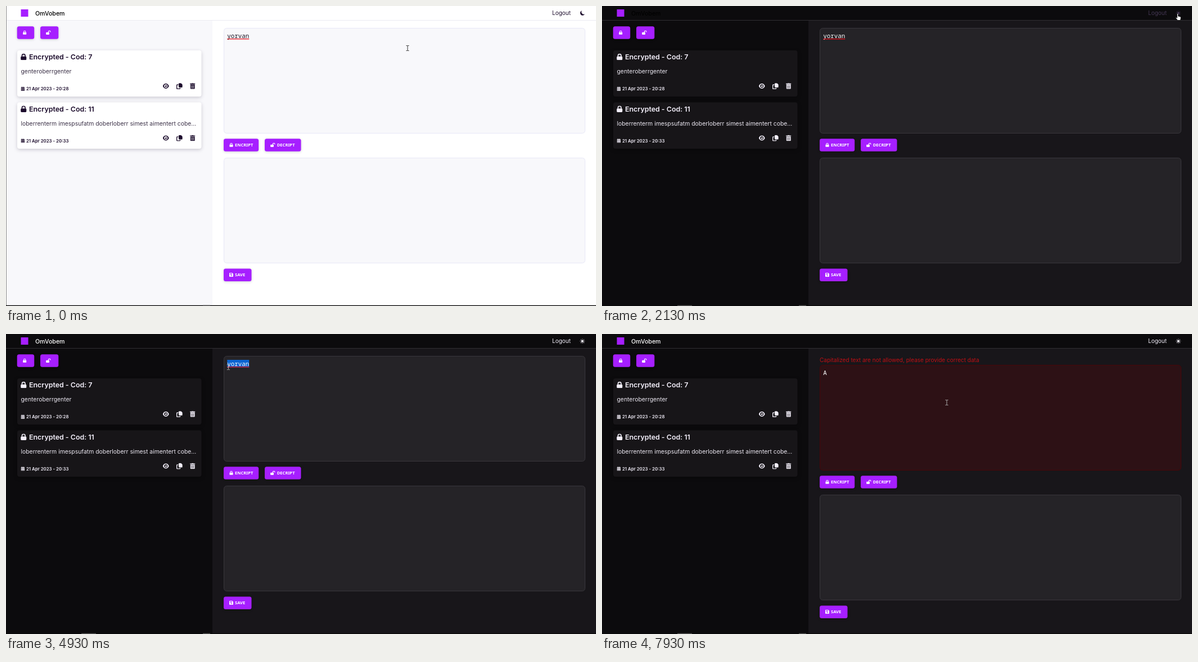
Recreate the animation shown at these times as an HTML page. Size 1049 by 534 pixels, loop 8000 ms.

```html
<!DOCTYPE html>
<html lang="en">
<head>
<meta charset="utf-8">
<title>Text encrypter</title>
<style>
  html, body { margin: 0; width: 100%; height: 100%; overflow: hidden; }
  svg { display: block; }
  #stage {
    --page: #fff; --side: #f8f8fb; --bar: #fff; --line: #ebebf1; --card: #fff;
    --box: #f8f8fb; --edge: #e7e7f7; --ink: #1c0c2c; --soft: #3c3248; --type: #17101f;
    --shade: rgba(20, 10, 40, .2); --beam: #333; --base: #050505; --bit: #444;
    width: 1049px; height: 534px;
    font-family: Inter, sans-serif; color: var(--ink);
  }
  #stage.dark {
    --page: #18161a; --side: #0c0b0d; --bar: #0c0b0d; --line: #302e33; --card: #171518;
    --box: #252327; --edge: #39363c; --ink: #f3effa; --soft: #ece8f2; --type: #fff;
    --shade: rgba(0, 0, 0, .3); --beam: #aaa; --base: #0a0a0a; --bit: #555;
  }
  text { fill: currentColor; white-space: pre; }
  use { fill: currentColor; }
  .card rect { fill: var(--card); filter: drop-shadow(0 2px 3px var(--shade)); }
  .title { font-size: 12.4px; font-weight: 600; }
  .body { font-size: 10.4px; fill: var(--soft); }
  .date { font-size: 7.8px; font-weight: 600; }
  .btn { color: #fff; }
  .btn rect { fill: #a61fff; filter: drop-shadow(0 1px 2px var(--shade)); }
  .btn text { font: 700 7.6px "Noto Sans", sans-serif; }
  .box { fill: var(--box); stroke: var(--edge); }
  .box.bad { fill: #2d1115; stroke: #480609; }
  .typed { font: 10.83px "Noto Sans Mono", monospace; fill: var(--type); }
  .pointer { fill: #fff; stroke: #000; stroke-width: .8; stroke-linejoin: round; }
</style>
</head>
<body>
<svg id="stage" viewBox="0 0 1049 534">
  <defs>
    <symbol id="lock" viewBox="0 0 16 16">
      <path fill-rule="evenodd" d="M3 7V5a5 5 0 0 1 10 0v2q2 0 2 2v5q0 2-2 2H3q-2 0-2-2V9q0-2 2-2zM5.2 7h5.6V5a2.8 2.8 0 0 0-5.6 0z"/>
    </symbol>
    <symbol id="unlock" viewBox="0 0 18 16">
      <path d="M8 7V5a5 5 0 0 1 10 0v2h-2.4V5a2.6 2.6 0 0 0-5.2 0v2q2 0 2 2v5q0 2-2 2H2q-2 0-2-2V9q0-2 2-2z"/>
    </symbol>
    <symbol id="eye" viewBox="0 0 16 14">
      <path fill-rule="evenodd" d="M0 7C3-1.8 13-1.8 16 7C13 15.8 3 15.8 0 7zM8 2.6a4.4 4.4 0 1 0 0 8.8a4.4 4.4 0 1 0 0-8.8zM8 4.6a2.4 2.4 0 1 1-2.4 2.4q2 0 2.4-2.4z"/>
    </symbol>
    <symbol id="copy" viewBox="0 0 16 16">
      <path d="M7.5 0H12l4 4v6q0 1.5-1.5 1.5h-7Q6 11.5 6 10V1.5Q6 0 7.5 0z"/>
      <path d="M5 4.5H2.200Q1 4.5 1 5.7V14q0 1.100 1.200 1.100H8.5q1.200 0 1.200-1.200V12.500" fill="none" stroke="currentColor" stroke-width="2"/>
    </symbol>
    <symbol id="trash" viewBox="0 0 14 16">
      <path fill-rule="evenodd" d="M0 1h4l.6-1h4.8L10 1h4v2H0zM1 4h12v10.5q0 1.5-1.5 1.5h-9Q1 16 1 14.5zM3.500 6v8h1V6zM6.500 6v8h1V6zM9.500 6v8h1V6z"/>
    </symbol>
    <symbol id="calendar" viewBox="0 0 14 16">
      <path fill-rule="evenodd" d="M3 0h2v2h4V0h2v2h3v3H0V2h3zM0 6h14v10H0zM2 8v2h2V8zM6 8v2h2V8zM10 8v2h2V8zM2 12v2h2v-2zM6 12v2h2v-2zM10 12v2h2v-2z"/>
    </symbol>
    <symbol id="disk" viewBox="0 0 16 16">
      <path fill-rule="evenodd" d="M2 0h10l4 4v10q0 2-2 2H2q-2 0-2-2V2q0-2 2-2zM3 2.500v4h8v-4zM8 8.500a2.500 2.500 0 1 0 .01 0z"/>
    </symbol>
  </defs>

  <rect width="1049" height="534" fill="var(--page)"/>
  <rect y="26" width="367" height="508" fill="var(--side)"/>
  <rect width="1049" height="26" fill="var(--bar)"/>
  <rect y="25" width="1049" height="1" fill="var(--line)"/>

  <rect x="26.5" y="6" width="13" height="13" fill="#a61fff"/>
  <text id="brand" x="52" y="16.800" font-size="10.6" font-weight="500">OmVobem</text>
  <g id="nav">
    <text x="971" y="16" font-size="10">Logout</text>
    <path id="moon" d="M1024 8.300A4.300 4.300 0 1 0 1029 14.300A4 4 0 0 1 1024 8.300z" fill="currentColor"/>
    <g id="sun" fill="currentColor" stroke="currentColor">
      <circle cx="1024.800" cy="12.700" r="2.200" stroke="none"/>
      <circle cx="1024.800" cy="12.700" r="3.700" fill="none" stroke-width="1.200" pathLength="24" stroke-dasharray="1 2" stroke-dashoffset=".5"/>
    </g>
  </g>

  <g id="left"></g>
  <text id="error" x="387" y="50" font-size="10" style="fill:#c20f14">Capitalized text are not allowed, please provide correct data</text>
  <g id="right">
    <rect id="input" class="box" x="387.5" y="39.5" width="642" height="187" rx="5"/>
    <rect id="mark" y="46" height="13.5" fill="#0a64d2"/>
    <text id="typed" class="typed" x="393.3" y="57"></text>
    <rect id="spell" x="393.3" y="58" width="39" height="1.300" fill="#e3141e"/>
    <rect id="caret" y="46" width="1" height="14" fill="#fff"/>
    <rect class="box" x="387.5" y="270.5" width="642" height="187" rx="5"/>
  </g>

  <rect id="rim" width="1" height="533" fill="#8b8b8b"/>
  <rect y="532.700" width="1049" height="1.300" fill="var(--base)"/>
  <g fill="var(--bit)">
    <rect id="bit" x="134" y="532.700" width="26" height="1.300"/>
    <rect x="350" y="532.700" width="13" height="1.300"/>
  </g>

  <g id="cursor">
    <path id="beam" d="M-2.500-4.500H-.7L0-4L.7-4.500H2.500M0-4V4M-2.500 4.500H-.7L0 4L.7 4.500H2.500" fill="none" stroke="var(--beam)"/>
    <path id="arrow" class="pointer" d="M0 0V9L2 7.200L3.400 10.300L4.900 9.600L3.500 6.600H6.200z"/>
    <path id="hand" class="pointer" d="M-1 1Q-1 0 0 0T1 1V4.600L4.600 5.400Q6 5.800 5.800 7.400L5 12H0L-3.400 7.800Q-3.600 6.400-2.400 6.700L-1 7.800z"/>
  </g>
</svg>

<script>
const LOOP = 8000, STEP = 1000 / 15, CHAR = 6.5, TEXT_X = 393.3, NAME = "yorvan";
const DARK = 2130, SELECT = 4600, CLEAR = 6000, BLINK = 530, WRONG = 6930;
const $ = id => document.getElementById(id);

// time, x, y of the pointer's hot spot
const path = [
  [0, 714, 75], [133, 1020, 24], [200, 1020, 24], [267, 970, 34], [600, 605, 74], [667, 605, 74],
  [1067, 1040, 34], [1333, 1042, 17], [1400, 1042, 17], [1667, 1023.5, 13.5], [2133, 1023.5, 13.5],
  [2867, 420, 58], [3000, 420, 58], [3200, 311, 62], [3333, 159, 70], [3667, 159, 70],
  [4000, 235, 522], [4067, 250, 522], [4533, 444, 57], [4600, 440, 57], [4933, 395, 59],
  [7267, 395, 59], [7533, 613, 121], [7800, 613, 121], [7933, 613, 122]
];

const icon = (id, x, y, w, h) => `<use href="#${id}" x="${x}" y="${y}" width="${w}" height="${h}"/>`;

const button = (x, y, w, id, iconW, label = "") => `<g class="btn">
  <rect x="${x}" y="${y}" width="${w}" height="22.6" rx="3.5"/>
  ${icon(id, x + 10, y + 7.3, iconW, 7.5)}
  <text x="${x + 13 + iconW}" y="${y + 13.6}">${label}</text></g>`;

const card = (y, code, body, time) => `<g class="card" transform="translate(0 ${y})">
  <rect x="20" width="327.5" height="82.3" rx="4"/>
  ${icon("lock", 25.5, 5.8, 11.5, 11.5)}
  <text class="title" x="41" y="16">Encrypted - Cod: ${code}</text>
  <text class="body" x="26.5" y="41">${body}</text>
  ${icon("calendar", 26.5, 64.5, 6.5, 7.5)}
  <text class="date" x="36" y="71.2">21 Apr 2023 - ${time}</text>
  ${icon("eye", 278.5, 58.7, 11.5, 9.5)}${icon("copy", 303, 58.2, 10.8, 10.8)}${icon("trash", 327, 58.2, 9.5, 10.5)}</g>`;

$("left").innerHTML =
  button(19.7, 36.2, 30.5, "lock", 7) + button(61, 36.2, 32.3, "unlock", 8.7) +
  card(79, 7, "genteroberrgenter", "20:28") +
  card(171.6, 11, "loberrenterm imespsufatm doberloberr simest aimentert cobe...", "20:33");
$("right").insertAdjacentHTML("beforeend",
  button(387, 236.2, 62.2, "lock", 7, "ENCRIPT") +
  button(460, 236.2, 64.5, "unlock", 8.7, "DECRIPT") +
  button(387, 467.4, 49.5, "disk", 7, "SAVE"));

const show = (id, on) => { $(id).style.display = on ? "" : "none"; };
const clamp = v => Math.max(0, Math.min(1, v));
const mix = (from, to, p) => `rgb(${from.map((v, i) => Math.round(v + (to[i] - v) * p))})`;

function pointerAt(t) {
  const i = path.findIndex(k => k[0] > t);
  if (i < 0) return path[path.length - 1].slice(1);
  const [t0, x0, y0] = path[i - 1], [t1, x1, y1] = path[i], p = (t - t0) / (t1 - t0);
  return [x0 + (x1 - x0) * p, y0 + (y1 - y0) * p];
}

function drawPointer(x, y) {
  const beam = x > 387 && x < 1029 && y > 40 && y < 242;
  const hand = Math.abs(x - 1024) < 6 && y < 20;
  $("cursor").setAttribute("transform", `translate(${x.toFixed(1)} ${y.toFixed(1)})`);
  show("beam", beam);
  show("hand", hand);
  show("arrow", !beam && !hand);
}

function drawInput(t, x) {
  const wrong = t >= WRONG, named = t < CLEAR;
  $("typed").textContent = named ? NAME : wrong ? "A" : "";
  show("spell", named);
  show("error", wrong);
  $("input").classList.toggle("bad", wrong);
  $("right").setAttribute("transform", `translate(0 ${wrong ? 16 : 0})`);

  const picking = t >= SELECT && named;
  const first = Math.max(0, Math.min(NAME.length, Math.round((x - TEXT_X) / CHAR)));
  show("mark", picking);
  $("mark").setAttribute("x", TEXT_X + first * CHAR);
  $("mark").setAttribute("width", (NAME.length - first) * CHAR);

  const since = t - (wrong ? WRONG : CLEAR);
  show("caret", !named && since < BLINK - 5);
  $("caret").setAttribute("x", wrong ? 400 : 393);
}

function draw(now) {
  const t = Math.round(Math.floor((now % LOOP + 4) / STEP) * STEP / 10) * 10;
  const dark = t >= DARK, fade = dark ? t - DARK + 60 : 0;
  $("stage").classList.toggle("dark", dark);
  $("nav").style.color = mix([28, 12, 44], [243, 239, 250], clamp(fade / 320));
  $("brand").style.color = mix([0, 0, 0], [255, 255, 255], clamp((fade - 60) / 320));
  show("moon", !dark);
  show("sun", dark);
  show("rim", t < 1930);
  show("bit", t >= 2070);

  const [x, y] = pointerAt(t);
  drawPointer(x, y);
  drawInput(t, x);
}

const start = performance.now();
function tick() {
  draw(performance.now() - start);
  requestAnimationFrame(tick);
}
tick();
</script>
</body>
</html>
```
